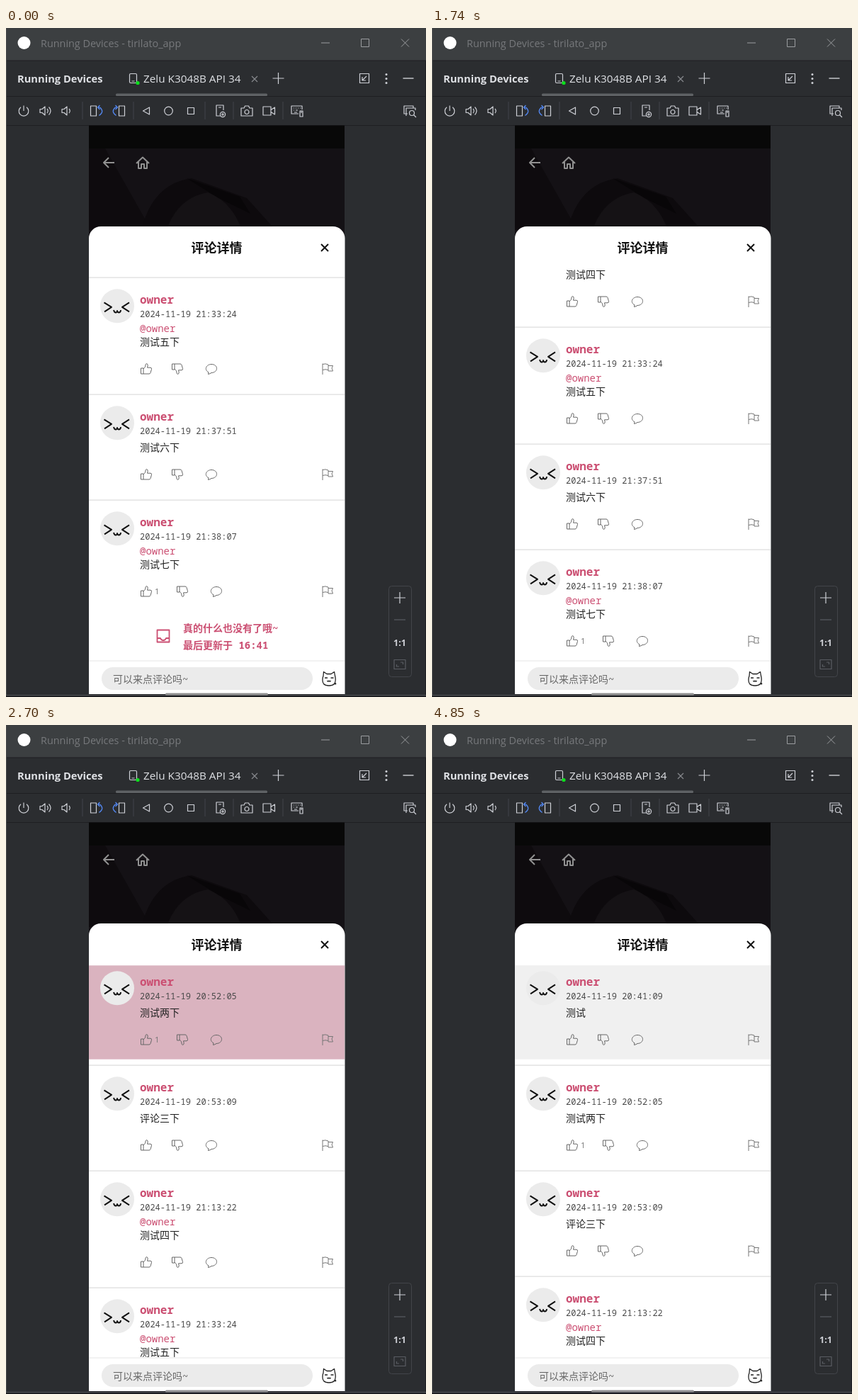
These frames come from a looping animation (593 by 944 pixels, 4.92 s). An HTML page:

```html
<!DOCTYPE html>
<html lang="zh-CN">
<head>
<meta charset="utf-8">
<style>
html, body { margin: 0; width: 100%; height: 100%; overflow: hidden; background: #2b2d30; }
svg { display: block; width: 100%; height: 100%; }
text { white-space: pre; }
.ui { font-family: "Open Sans", "Noto Sans", sans-serif; }
.app { font-family: "Noto Sans Mono", "Noto Sans CJK SC", "Noto Sans CJK JP", monospace; }
.cjk { font-family: "Noto Sans CJK SC", "Noto Sans CJK JP", sans-serif; }
</style>
</head>
<body>
<svg id="stage" viewBox="0 0 593 944"></svg>
<script>
const LOOP = 4920, PINK = '#cb4f72';

const rect = (x, y, w, h, fill, extra = '') =>
  `<rect x="${x}" y="${y}" width="${w}" height="${h}" fill="${fill}" ${extra}/>`;
const text = (x, y, size, fill, str, cls = 'app', weight = 400, extra = '') =>
  `<text x="${x}" y="${y}" font-size="${size}" fill="${fill}" class="${cls}" font-weight="${weight}" ${extra}>${str}</text>`;
const icon = (x, y, d, color = '#ced0d6', width = 1.2, extra = '') =>
  `<path transform="translate(${x} ${y}) ${extra}" d="${d}" fill="none" stroke="${color}" stroke-width="${width}" stroke-linejoin="round"/>`;
const ring = r => `M${-r} 0a${r} ${r} 0 1 0 ${2 * r} 0a${r} ${r} 0 1 0 ${-2 * r} 0`;
const cross = r => `M${-r} ${-r}L${r} ${r}M${r} ${-r}L${-r} ${r}`;
const plus = r => `M${-r} 0H${r}M0 ${-r}V${r}`;

const THUMB = 'M-7.5 -1H-4V7H-7.5ZM-4 0Q-.5 -2.5 -.8 -6.5Q0 -8 1.5 -7Q3 -5.5 1.5 -1.8H6Q8 -1.5 7.5 .5L6 5.5Q5.5 7 4 7H-4';
const BUBBLE = 'M-4.5 7.5L-4 4.8C-11 1 -7 -6.5 0 -6.5C10 -6.5 10 5.2 0 5.5Q-2 7 -4.5 7.5Z';
const FLAG = 'M-7 8V-7.5M-7 -6.5Q-3 -8 1 -6V1.5Q-3 0 -7 1.5M1 -4.5H7.5L6 -1L7.5 3H1V1.5';

function chrome() {
  const y = 117, dim = '#9b9da0', blue = '#548af7';
  let s = rect(0, 0, 593, 944, '#2b2d30') + rect(0, 0, 593, 46, '#3c3f41') + rect(0, 45.5, 593, 1, '#1e1f22');
  s += '<circle cx="25.5" cy="21" r="9" fill="#fff"/>';
  s += text(49, 26.5, 14.4, '#77797c', 'Running Devices - tirilato_app', 'ui');
  s += icon(451, 21, 'M-6 0H6', dim, 1) + icon(507, 21, 'M-5.5 -5.5H5.5V5.5H-5.5Z', dim, 1) + icon(563.5, 21, cross(5.5), dim, 1);

  s += text(16, 76.5, 14.7, '#dfe1e5', 'Running Devices', 'ui', 700);
  s += icon(179.5, 71, 'M-3.5 -6.5H3.5Q5 -6.5 5 -5V5Q5 6.5 3.5 6.5H-3.5Q-5 6.5 -5 5V-5Q-5 -6.5 -3.5 -6.5ZM-2 4H2');
  s += '<circle cx="186" cy="77.5" r="2.6" fill="#0be01c"/>';
  s += text(194, 76.5, 15.3, '#dfe1e5', 'Zelu K3048B API 34', 'ui');
  s += icon(351, 72, cross(4), '#87898d') + icon(384.5, 71, plus(8));
  s += rect(155, 92.5, 214, 3.5, '#5f6265', 'rx="1.5"') + rect(0, 96, 593, 1, '#1e1f22');
  s += icon(506, 71, 'M-6.5 -6.5H6.5V6.5H-6.5ZM3 -3L-2.5 2.5M-3 -2V3H2');
  s += [65.5, 71.5, 77.5].map(cy => `<circle cx="537" cy="${cy}" r="1.5" fill="#ced0d6"/>`).join('');
  s += icon(568, 71, 'M-7.5 0H7.5', undefined, 1.4);

  s += icon(25, y, 'M-4 -5.2A6.8 6.8 0 1 0 4 -5.2M0 -7.5V0');
  const speaker = 'M-8 -2.5H-5L-1 -6V6L-5 2.5H-8Z';
  s += icon(56, y, speaker + 'M2 -3Q4.5 0 2 3M4.5 -5.5Q9.5 0 4.5 5.5') + icon(87, y, speaker + 'M2 -3Q4.5 0 2 3');
  for (const x of [108, 180, 281, 321, 391]) s += rect(x - .5, 104, 1, 25, '#43454a');
  const body = 'M-8 -7H0V7H-8Z';
  s += icon(127.5, y, body) + icon(127.5, y, 'M4 6.5Q12 1 5 -5H2M5 -8L2 -5L5 -2', blue);
  s += icon(159.5, y, body, undefined, 1.2, 'scale(-1 1)') + icon(159.5, y, 'M-4 6.5Q-12 1 -5 -5H-2M-5 -8L-2 -5L-5 -2', blue);
  s += icon(198.5, y, 'M-5 0L4 -5V5Z') + icon(229.5, y, ring(5.8)) + icon(261, y, 'M-4.5 -4.5H4.5V4.5H-4.5Z');
  s += icon(302, y, 'M1 7H-5V-8H5V-1M-2 -5H2') + icon(306, 122, ring(3.6) + ring(1.2));
  s += icon(340, y, 'M-8 -4H-4L-2.5 -7H2.5L4 -4H8V7H-8Z') + icon(340, 118.5, ring(3));
  s += icon(371, y, 'M-8 -6H3V6H-8ZM3 -1.5L8.5 -5V5L3 1.5');
  s += icon(411, y, 'M2 4H-8V-7H7V-2M-5 -4H-4M-2 -4H-1M1 -4H2M4 -4H5M-5 -1H-4M-2 -1H1M-4 2H0M4 0H8V8H4ZM6 0V3');
  s += icon(570, y, 'M-3 4H-8V-7H5V-4M-5 7V-4H8V-1') + icon(573, 120, ring(3.5) + 'M2.5 2.5L6 6');
  s += rect(0, 137, 593, 1, '#1e1f22');

  s += rect(540.5, 787.5, 32, 128, '#2b2d30', 'rx="4" stroke="#43454a"');
  s += icon(556, 804, plus(8)) + icon(556, 835, 'M-8 0H8', '#5a5d63');
  s += text(556, 871.5, 12.5, '#ced0d6', '1:1', 'ui', 700, 'text-anchor="middle"');
  s += icon(556, 898, 'M-8 -6.5H8V6.5H-8ZM1 -3H4.5V0M-1 3H-4.5V0', '#5a5d63');
  s += rect(0, 0, 1, 944, '#47494b') + rect(592, 46, 1, 898, '#1e1f22') + rect(0, 941, 593, 1, '#55575a') + rect(0, 942, 593, 2, '#1e1f22');
  return s;
}

function phone() {
  let s = rect(117, 137.5, 361, 803, '#080808') + rect(117, 170, 361, 130, '#141115');
  s += '<g clip-path="url(#photo)">' +
    '<path d="M117 170H140L205 285H117Z" fill="#0e0b0e"/>' +
    '<path d="M190 290Q205 220 262 212L340 240L385 290Z" fill="#0d0a0d"/>' +
    '<path d="M225 290Q240 240 285 232Q320 245 335 290Z" fill="#151215"/>' +
    '<path d="M255 212L330 238L345 262L300 240Z" fill="#080608"/></g>';
  s += icon(145, 190, 'M8 0H-7M0 -7L-7 0L0 7', '#919191', 2);
  s += icon(193, 190, 'M-9 1L0 -7.5L9 1M-6 -1V8H-2V2H2V8H6V-1', '#919191', 2);
  s += '<path d="M117 940V297A17 17 0 0 1 134 280H461.5A17 17 0 0 1 478.5 297V940Z" fill="#fff"/>';
  s += text(297.5, 317, 18, '#111', '评论详情', 'cjk', 700, 'text-anchor="middle"');
  s += icon(450, 310, cross(5), '#111', 2);
  return s;
}

function actions(y, liked) {
  const shift = liked ? 7 : 0, c = '#666';
  return icon(198, y, THUMB, c, 1) + (liked ? text(210, y + 4, 11.5, '#777', '1', 'ui') : '') +
    icon(242 + shift, y, THUMB, c, 1, 'scale(1 -1)') +
    icon(290 + shift, y, BUBBLE, c, 1) + icon(454, y, FLAG, '#777', 1);
}

// time, body, is a reply, has a like
const rows = [
  ['20:41:09', '测试', 0, 0],
  ['20:52:05', '测试两下', 0, 1],
  ['20:53:09', '评论三下', 0, 0],
  ['21:13:22', '测试四下', 1, 0],
  ['21:33:24', '测试五下', 1, 0],
  ['21:37:51', '测试六下', 0, 0],
  ['21:38:07', '测试七下', 1, 1],
];

function comments() {
  let s = '', y = 0;
  for (let i = 0; i < 9; i++) {
    const line = i < 8 ? (i % 2 ? '好长' : '长好').repeat(10).slice(0, 19) : '长好长好长的评论';
    s += text(189.5, -237 + i * 20.1, 14, '#222', line, 'cjk');
  }
  s += actions(-44, 1) + rect(117, -16, 361, 24.3, '#ebebeb');
  rows.forEach(([time, body, reply, liked], i) => {
    const low = reply ? 16 : 0;
    s += `<g transform="translate(0 ${y})">` +
      (i ? rect(117, -.4, 361, 1, '#d4d4d4') : '') +
      rect(117, 8.3, 361, 132.4 + low, '#fff', `id="mark${i}" opacity="0"`) +
      '<circle cx="157" cy="40.3" r="24" fill="#ebebeb"/>' +
      icon(157, 40.3, 'M-18.5 -5L-8 1.5L-18 8M17 -5L7 1.5L17 8', '#111', 2) +
      icon(157, 41, 'M-5 5Q-4 9 -1.5 8.5Q0 8 0 6Q.5 8.5 2.5 8.5Q5 8 5 5', '#111', 1.9) +
      text(189, 37, 16, PINK, 'owner', 'app', 600) +
      text(189, 56, 12, '#4a4a4a', '2024-11-19 ' + time, 'app', 500) +
      (reply ? text(189, 77, 14, PINK, '@owner') : '') +
      text(189, 80 + low, 14, '#222', body, 'cjk') +
      actions(113 + low, liked) + '</g>';
    y += 149 + low;
  });
  const end = y - 165;
  s += icon(222, end + 192, 'M-8.5 -8.5H8.5V8.5H-8.5ZM-8.5 3H-4Q-3 6 0 6Q3 6 4 3H8.5', PINK, 1.8);
  s += text(250, end + 186, 14, PINK, '真的什么也没有了哦~', 'app', 600);
  s += text(250, end + 210, 14, PINK, '最后更新于 16:41', 'app', 600);
  return s;
}

function inputBar() {
  return rect(117, 893, 361, 47, '#fff') + rect(117, 892.5, 361, 1, '#e6e6e6') +
    rect(135, 902, 298, 32, '#ebebeb', 'rx="16"') + text(151, 924, 14, '#666', '可以来点评论吗~') +
    icon(456, 918, 'M-8 -4L-7.5 -9.5L-3 -6.5H3L7.5 -9.5L8.5 -4Q10.5 3 7.5 7.5Q5 10 0 10Q-5 10 -7.5 7.5Q-10.5 3 -8 -4ZM-6 -1H-2M2.5 -1H6.5M-2.5 3Q-1 5 0 3Q1 5 2.5 3M7 7Q11 9 9 6', '#222', 1.3) +
    rect(225, 938.5, 145, 3, '#8f8f8f', 'rx="1.5"');
}

document.getElementById('stage').innerHTML =
  '<defs><clipPath id="view"><rect x="117" y="339" width="361.5" height="554"/></clipPath>' +
  '<clipPath id="photo"><rect x="117" y="170" width="361" height="130"/></clipPath></defs>' +
  chrome() + phone() +
  `<g clip-path="url(#view)"><g id="list">${comments()}</g></g>` + inputBar();

const list = document.getElementById('list');
const marks = rows.map((_, i) => document.getElementById('mark' + i));

// progress in n equal time steps, the first one taken at start
const stepped = (t, start, step, n) => Math.max(0, Math.min(1, (Math.floor((t - start) / step) + 1) / n));
const easeOut = u => 1 - (1 - u) ** 2.57;
const easeInOut = u => u * u * (3 - 2 * u);
const lerp = (a, b, u) => a + (b - a) * u;

const flash = [
  [1900, '#e5abba'], [2140, '#e0afbc'], [2220, '#dab3bf'], [2860, '#d8bec6'],
  [2940, '#d7cace'], [3020, '#e6e0e2'], [3180, '#fff'],
];

function draw(t) {
  const up = easeOut(stepped(t, 700, 80, 7));
  const down = easeInOut(stepped(t, 1980, 80, 4));
  const back = easeOut(stepped(t, 3660, 70, 7));
  const y = t < 1900 ? lerp(-260, -190, up) : t < 3660 ? lerp(587, 182, down) : lerp(182, 331, back);
  list.setAttribute('transform', `translate(0 ${Math.floor(y)})`);

  const paint = (i, fill, alpha) => {
    marks[i].setAttribute('fill', fill);
    marks[i].setAttribute('opacity', alpha);
  };
  paint(5, '#d7cace', t < 1740 ? up : 0);
  const hit = flash.filter(([at]) => t >= at).pop();
  paint(1, hit ? hit[1] : '#fff', hit ? 1 : 0);
  paint(0, '#f0f0f0', back);
}

let origin;
function tick(now) {
  origin ??= now;
  draw((now - origin) % LOOP);
  requestAnimationFrame(tick);
}
draw(0);
requestAnimationFrame(tick);
</script>
</body>
</html>
```
